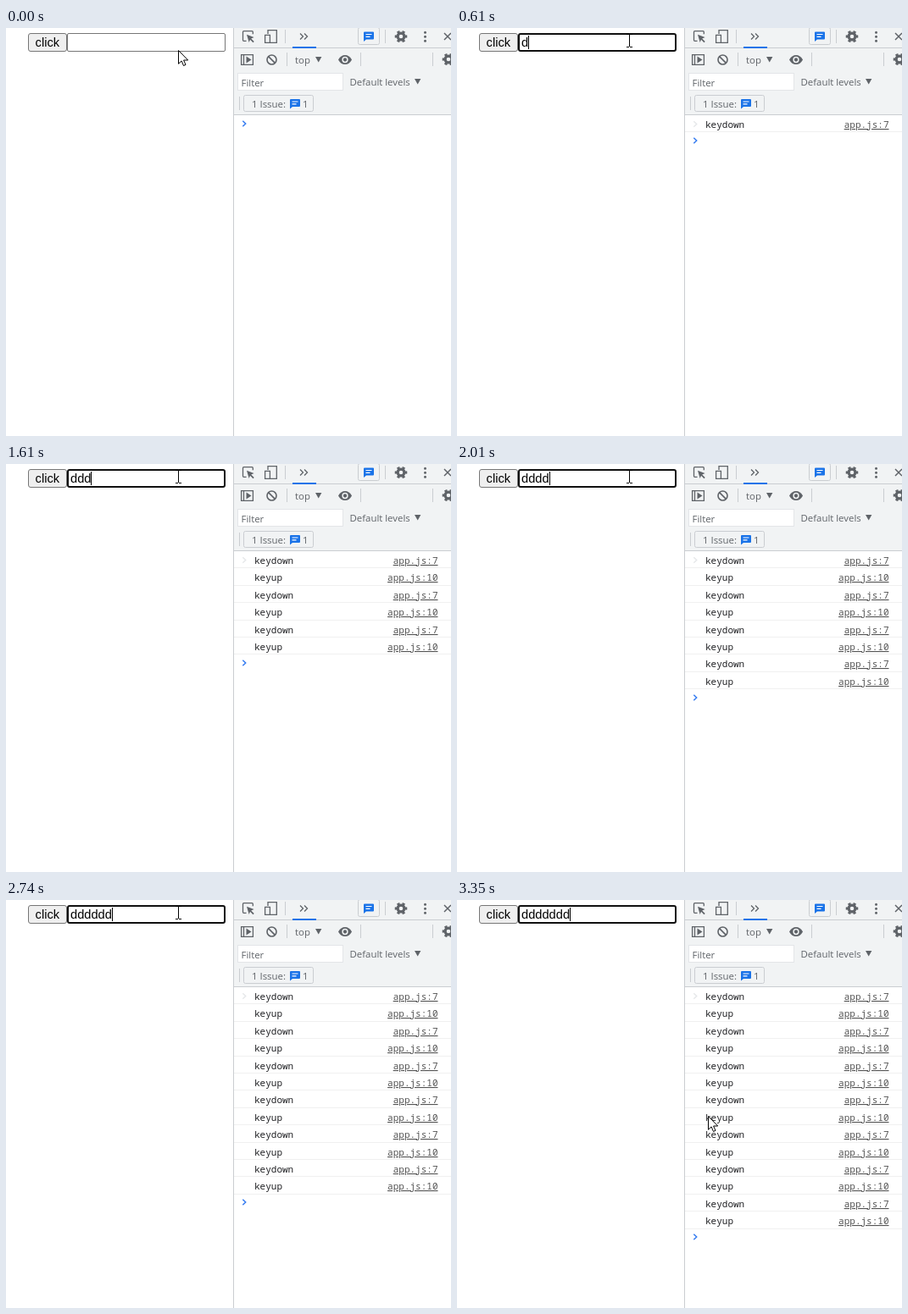
An HTML page that plays this animation: 525 px wide and 482 px high, repeating every 3.4 s.

```html
<!DOCTYPE html>
<html lang="en">
<head>
<meta charset="utf-8">
<title>Key events</title>
<style>
  html, body { margin: 0; width: 100%; height: 100%; overflow: hidden; background: #fff; }
  svg { display: block; }
  text { white-space: pre; }
  .page { font: 14.67px "Liberation Sans", Arial, sans-serif; }
  .ui { font: 11.4px "Open Sans", "Noto Sans", sans-serif; fill: #5f6368; }
  .log { font: 11px "Noto Sans Mono", monospace; fill: #202124; }
  .link { fill: #545454; text-anchor: end; text-decoration: underline; }
  .icon { fill: none; stroke: #5f6368; stroke-width: 1.3; }
  .solid { fill: #5f6368; }
  .rule { fill: none; stroke: #cacdd1; }
  .prompt { fill: none; stroke: #367cf1; stroke-width: 1.5; }
</style>
</head>
<body>
<svg width="525" height="482" viewBox="0 0 525 482">
  <defs>
    <g id="gear" fill="none" stroke="#5f6368">
      <circle r="3.9" stroke-width="3.2"/>
      <circle r="6" stroke-width="2.6" pathLength="12" stroke-dasharray="1" stroke-dashoffset=".5"/>
    </g>
    <g id="bubble">
      <path d="M1 0h10q1 0 1 1v7q0 1-1 1H3L0 11.5V1q0-1 1-1z" fill="#1a73e8"/>
      <path d="M2.5 3h7M2.5 5.8h5" stroke="#fff" stroke-width="1.2"/>
    </g>
    <path id="down" class="solid" d="M0 0h7.4L3.7 6.6z"/>
    <path id="chevron" d="M.8-3.3 4.2 0 .8 3.3"/>
  </defs>

  <!-- Page controls -->
  <rect x="26.5" y="6.5" width="45" height="21" rx="2.5" fill="#efefef" stroke="#767676"/>
  <text class="page" x="34.6" y="22">click</text>
  <rect id="idleBox" x="72.5" y="6.5" width="186" height="21" rx="1.5" fill="#fff" stroke="#767676"/>
  <g id="focusBox">
    <rect x="73" y="7" width="185" height="20" rx="2" fill="#fff" stroke="#101010" stroke-width="2"/>
    <text id="typed" class="page" x="76" y="22"></text>
    <rect id="caret" y="9" width="1" height="16"/>
  </g>

  <!-- Console toolbars -->
  <rect x="269" width="256" height="102" fill="#f1f3f4"/>
  <path class="rule" d="M268.5 0v482M269 23.5h256M269 102.5h256M329.5 2v16M447.5 2v16M331.5 29v16M418.5 29v16M503.5 29v16M275.5 81v16"/>
  <path d="M338 23h28" stroke="#1a73e8" stroke-width="2"/>

  <g class="icon">
    <path d="M283.5 15.3h-3q-1 0-1-1v-9.600q0-1 1-1h9.800q1 0 1 1v2.600"/>
    <path class="solid" stroke="none" d="M284 7.700l8.600 3.400-3.400 1.400 3.500 3.500-1.200 1.200-3.500-3.500-1.300 3.300z"/>
    <path d="M309 7V2.700h10.300v14.600H312M305.600 8.300h5.800v9h-5.800z"/>
    <path d="M347 6.500l3.500 3.500-3.500 3.500M352 6.500l3.500 3.500-3.500 3.500"/>
    <path d="M517 6l8 8M525 6l-8 8" stroke-width="1.5"/>
    <path d="M277.600 31.600h13.800v11.800h-13.800zM280.500 32v11"/>
    <path class="solid" stroke="none" d="M283.500 33.500l6 4-6 4z"/>
    <circle cx="313.500" cy="37.500" r="5.500" stroke-width="1.600"/>
    <path d="M309.600 33.600l7.800 7.800" stroke-width="1.600"/>
  </g>
  <g class="solid">
    <circle cx="494.500" cy="5.300" r="1.500"/><circle cx="494.500" cy="10.300" r="1.500"/><circle cx="494.500" cy="15.300" r="1.500"/>
    <path d="M392 37.500q3-5.500 8-5.500t8 5.500q-3 5.500-8 5.500t-8-5.500z"/>
  </g>
  <circle cx="400" cy="37.500" r="2.900" fill="#5f6368" stroke="#f1f3f4" stroke-width="1.500"/>
  <use href="#gear" x="466" y="10"/>
  <use href="#gear" x="522" y="37"/>

  <rect class="rule" x="415.500" y="-.5" width="25" height="20" rx="2"/>
  <use href="#bubble" x="422" y="4.500"/>
  <rect class="rule" x="280.500" y="79.500" width="82" height="19" rx="2"/>
  <use href="#bubble" x="335" y="84"/>
  <rect x="273.500" y="53.500" width="124" height="20" fill="#fff" stroke="#e3e5e8"/>
  <use href="#down" x="365" y="34"/>
  <use href="#down" x="482" y="60"/>
  <g class="ui">
    <text x="341" y="42">top</text>
    <text x="277.500" y="69">Filter</text>
    <text x="405.500" y="68">Default levels</text>
    <text x="290" y="94">1 Issue:</text>
    <text x="350" y="94">1</text>
  </g>

  <!-- Console output -->
  <g id="rows"></g>
  <use id="firstMark" class="prompt" href="#chevron" x="278.500" y="113.500" style="stroke:#e6e8ea"/>
  <use id="prompt" class="prompt" href="#chevron" x="278.500"/>

  <!-- Pointer -->
  <circle id="press" cx="201" cy="14" r="12" fill="#ff0" fill-opacity=".47"/>
  <path id="beam" d="M200 7.500h3m1 0h3M203.500 8v14M200 22.500h3m1 0h3" fill="none" stroke="#000"/>
  <path id="arrow" d="M.5.5V16.300L4.100 12.900 6.500 18.500 9 17.400 6.600 12H11.700z" fill="#fff" stroke="#000"/>
</svg>
<script>
  const LOOP = 3400, ROW = 20.4;
  // Times of: character shown, keydown logged, keyup logged
  const keys = [
    [610, 610, 740], [1070, 1070, 1200], [1470, 1540, 1610], [1870, 1940, 2010],
    [2270, 2270, 2340], [2670, 2670, 2740], [3070, 3140, 3210]
  ];
  const get = id => document.getElementById(id);
  const show = (id, on) => get(id).style.display = on ? '' : 'none';

  const logTimes = keys.flatMap(([, down, up]) => [down, up]);
  get('rows').innerHTML = logTimes.map((_, i) => {
    const [name, line] = i % 2 ? ['keyup', 10] : ['keydown', 7];
    const y = Math.round(118 + i * ROW);
    const edge = Math.round(102 + (i + 1) * ROW) + .5;
    return `<g class="log"><text x="293" y="${y}">${name}</text>
      <text class="link" x="509.5" y="${y}">app.js:${line}</text>
      <path d="M269 ${edge}h256" stroke="#f0f0f0"/></g>`;
  }).join('');
  const rows = [...get('rows').children];

  function draw(t) {
    const chars = keys.filter(([typed]) => t >= typed).length;
    const logged = logTimes.filter(time => t >= time).length;
    const focused = t >= 130;
    const away = t >= 3350;

    show('idleBox', !focused);
    show('focusBox', focused);
    get('typed').textContent = 'd'.repeat(chars);
    get('caret').setAttribute('x', Math.round(76 + chars * 8.16));

    rows.forEach((row, i) => row.style.display = i < logged ? '' : 'none');
    show('firstMark', logged > 0);
    get('prompt').setAttribute('y', logged ? Math.round(112.4 + logged * ROW) : 113);

    show('press', t >= 130 && t < 280);
    show('beam', t >= 70 && !away);
    show('arrow', t < 70 || away);
    get('arrow').setAttribute('transform', away ? 'translate(296 255)' : 'translate(203 26)');
  }

  function tick() {
    draw(performance.now() % LOOP);
    requestAnimationFrame(tick);
  }
  tick();
</script>
</body>
</html>
```
